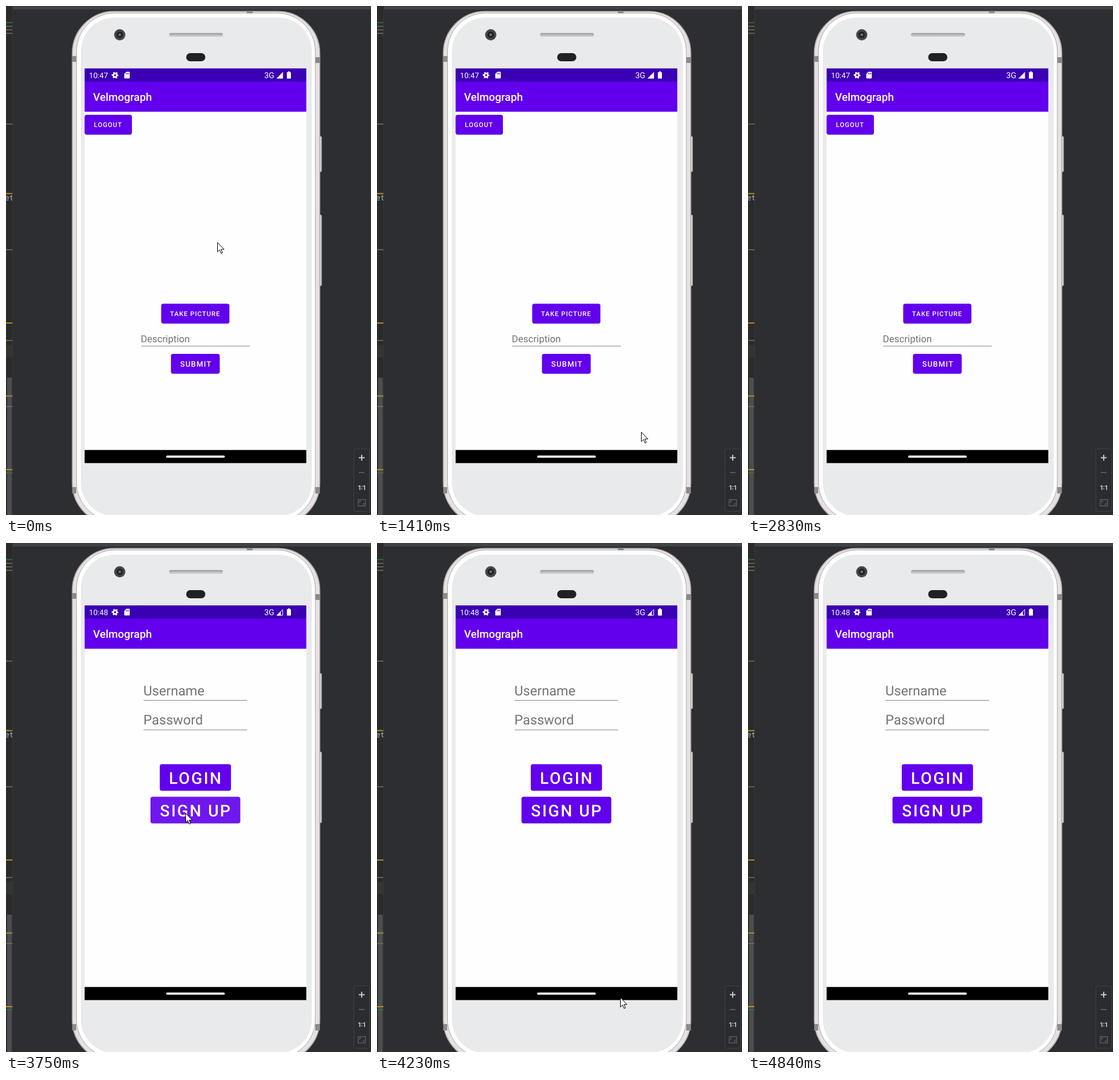
An HTML page for the animation above (8 s loop, 629 by 875 pixels).

```html
<!DOCTYPE html>
<html lang="en">
<head>
<meta charset="utf-8">
<title>Phone logout</title>
<style>
html, body { margin: 0; width: 100%; height: 100%; overflow: hidden; background: #2d2e32; }
svg { display: block; width: 629px; height: 875px; font-family: Roboto, sans-serif; text-rendering: geometricPrecision; }
.mark { fill: #8d898a; }
.key { fill: #d9d6d7; stroke: #858283; stroke-width: .8; }
.btn { fill: #6200ee; filter: drop-shadow(0 1px .6px #0003); }
.label { fill: #fff; font-weight: 500; letter-spacing: .089em; }
.small { font-size: 11.2px; }
.medium { font-size: 13px; }
.large { font-size: 27.9px; }
.hint { fill: #737373; font-size: 23.2px; }
.rule { stroke: #858585; }
.tan { stroke: #777061; stroke-width: 1.6; }
.gold { stroke: #b38a24; stroke-width: 1.8; }
.green { stroke: #287d39; stroke-width: 1.6; }

.before, .after, .press, .cursor { animation: 8s step-end infinite; }
.before { animation-name: before; }
.after { animation-name: after; }
.press { animation-name: press; }
.cursor { animation-name: cursor; }

@keyframes before { 0% { visibility: visible } 46.875%, 100% { visibility: hidden } }
@keyframes after { 0% { visibility: hidden } 46.875%, 100% { visibility: visible } }
@keyframes press { 0% { opacity: .09 } 48.375%, 100% { opacity: 0 } }
@keyframes cursor {
  0% { transform: translate(364px, 406px); visibility: visible }
  13.125% { transform: translate(433px, 471px) }
  14.625% { transform: translate(487px, 566px) }
  16.125% { transform: translate(477px, 678px) }
  17.625% { transform: translate(455px, 732px) }
  32.375% { transform: translate(466px, 777px) }
  33.875% { transform: translate(490px, 850px); visibility: visible }
  35.375% { transform: translate(490px, 850px); visibility: hidden }
  46.875% { transform: translate(309px, 464px); visibility: visible }
  51.375% { transform: translate(372px, 655px) }
  52.875% { transform: translate(419px, 781px) }
  57.5% { transform: translate(446px, 821px) }
  59% { transform: translate(487px, 862px); visibility: visible }
  60.5%, 100% { transform: translate(487px, 862px); visibility: hidden }
}
</style>
</head>
<body>
<svg viewBox="0 0 629 875">
  <defs>
    <linearGradient id="slot" x2="0" y2="1">
      <stop stop-color="#92979b"/><stop offset=".5" stop-color="#b9bcbf"/><stop offset="1" stop-color="#d5d7d9"/>
    </linearGradient>
    <clipPath id="strip"><path d="M0 0H11V875H0Z"/></clipPath>
  </defs>

  <!-- Editor background -->
  <path fill="#2d2e32" d="M0 0H629V875H0Z"/>
  <path fill="#404246" d="M12 0H629V6H12Z"/>
  <g clip-path="url(#strip)">
    <path fill="#2b2b2b" d="M0 0H11V875H0Z"/>
    <path fill="#323532" d="M0 583H11V604H0Z"/>
    <path fill="#4d4e4f" d="M2 639H10V875H2Z"/>
    <path class="tan" d="M0 35H11M0 41H11M0 47H11M0 203H11M0 419H11M0 575H11M0 688.5H11"/>
    <path class="gold" d="M0 322.5H11M0 545H11M0 670.5H11M0 797H11"/>
    <path class="green" d="M0 28.5H11M0 802.5H11"/>
    <text x="-2" y="334" font-size="13" fill="#a9b7c6" font-family="Noto Sans Mono, monospace">et</text>
  </g>
  <path stroke="#35373a" d="M11.5 0V875"/>

  <!-- Phone body -->
  <rect class="key" x="539" y="224" width="5" height="61" rx="1.5"/>
  <rect class="key" x="539" y="359" width="5" height="122" rx="1.5"/>
  <rect x="114.3" y="9.3" width="426.4" height="882.4" rx="72" fill="#e6e1e2" stroke="#b6aeb1" stroke-width="1.6"/>
  <rect x="121.5" y="12" width="411.5" height="873" rx="66" fill="#fff" stroke="#aaa4a6"/>
  <rect x="129" y="20" width="398" height="857" rx="58" fill="#e9eaec"/>
  <path class="mark" d="M114 86H121V96H114ZM533 88H541V98H533ZM114 827H121V838H114ZM533 827H541V838H533ZM415 8.5H425V12.5H415Z"/>
  <circle cx="196" cy="49.5" r="9.7" fill="#45484b"/>
  <circle cx="196" cy="49.5" r="5.8" fill="#202326"/>
  <circle cx="196" cy="49.5" r="2.3" fill="#6b7378"/>
  <rect x="281" y="46.5" width="93" height="6.5" rx="3" fill="url(#slot)"/>
  <rect x="310.5" y="81" width="33" height="14" rx="7" fill="#202124"/>

  <!-- Screen -->
  <path fill="#fefefe" d="M135.5 107H517.5V785H135.5Z"/>
  <path fill="#3a00b3" d="M135.5 107.3H517.5V130H135.5Z"/>
  <path fill="#6200ee" d="M135.5 130H517.5V181.7H135.5Z"/>
  <path fill="#000" d="M135.5 763.3H517.5V785.7H135.5Z"/>
  <rect x="276" y="772.8" width="101" height="3.8" rx="1.9" fill="#fff"/>
  <text x="150" y="162.7" font-size="18.7" font-weight="500" fill="#fff">Velmograph</text>

  <!-- Status bar -->
  <g fill="#fff">
    <circle cx="188" cy="119" r="3.1" fill="none" stroke="#fff" stroke-width="2.6"/>
    <circle cx="188" cy="119" r="4.9" fill="none" stroke="#fff" stroke-width="1.8" stroke-dasharray="2.6 2.53" stroke-dashoffset="1.3"/>
    <path d="M207.5 113H212Q213.3 113 213.3 114.3V123.3Q213.3 124.5 212 124.5H205Q203.8 124.5 203.8 123.3V116.7Z"/>
    <path stroke="#3a00b3" d="M207.3 115V117.5M209.3 115V117.5M211.3 115V117.5"/>
    <text x="445" y="123.5" font-size="14">3G</text>
    <path d="M486 113.8V112.5H489V113.8H490.2Q491 113.8 491 114.6V124Q491 124.8 490.2 124.8H484.8Q484 124.8 484 124V114.6Q484 113.8 484.8 113.8Z"/>
  </g>

  <g class="before">
    <text x="143" y="123.6" font-size="13.2" fill="#fff">10:47</text>
    <path fill="#fff" d="M466 124.7H477.3V113.2Z"/>
    <rect class="btn" x="135.5" y="187" width="81.5" height="34" rx="3.7"/>
    <text class="label small" x="151.5" y="208">LOGOUT</text>
    <rect class="btn" x="267.5" y="511.7" width="117.5" height="34" rx="3.7"/>
    <text class="label small" x="282.8" y="532.8">TAKE PICTURE</text>
    <text class="hint" x="232.3" y="578" style="font-size:16.7px">Description</text>
    <path class="rule" d="M233 584.7H420"/>
    <rect class="btn" x="284.3" y="598" width="84" height="34" rx="3.7"/>
    <text class="label medium" x="300.2" y="619.7">SUBMIT</text>
  </g>

  <g class="after">
    <text x="143" y="123.6" font-size="13.2" fill="#fff">10:48</text>
    <path fill="#fff" d="M466 124.7H473.5V117Z"/>
    <path fill="none" stroke="#fff" d="M467.2 124.2H476.8V114.4Z"/>
    <text class="hint" x="236.8" y="261.7">Username</text>
    <path class="rule" d="M237 270.5H415.5"/>
    <text class="hint" x="236.8" y="312.4">Password</text>
    <path class="rule" d="M237 321.3H415.5"/>
    <rect class="btn" x="265" y="380.3" width="122.7" height="45.5" rx="3.7"/>
    <text class="label large" x="280.8" y="414">LOGIN</text>
    <rect class="btn" x="249" y="436.2" width="154.7" height="45.5" rx="3.7"/>
    <rect class="press" x="249" y="436.2" width="154.7" height="45.5" rx="3.7" fill="#fff"/>
    <text class="label large" x="265.3" y="470">SIGN UP</text>
  </g>

  <!-- Zoom controls -->
  <rect x="599.5" y="761.5" width="27" height="107" rx="3" fill="#2b2c2f" stroke="#3f4145"/>
  <path stroke="#c8c9cb" stroke-width="2" d="M608 776.5H618M613 771.5V781.5"/>
  <path stroke="#606265" stroke-width="1.6" d="M608 802H618"/>
  <text x="613" y="832" text-anchor="middle" font-size="11" font-weight="700" fill="#c4c5c7" font-family="Inter, sans-serif">1:1</text>
  <g fill="none" stroke="#626467" stroke-width="1.2">
    <rect x="607" y="848.5" width="12.5" height="11"/>
    <path d="M609.5 854V851H612.5M617 854V857H614"/>
  </g>

  <path class="cursor" d="M.5 .5V16.8L4.2 13.2 6.8 19.2 9.2 18.1 6.6 12.3H11.8Z" fill="#fff" stroke="#000"/>
</svg>
</body>
</html>
```
